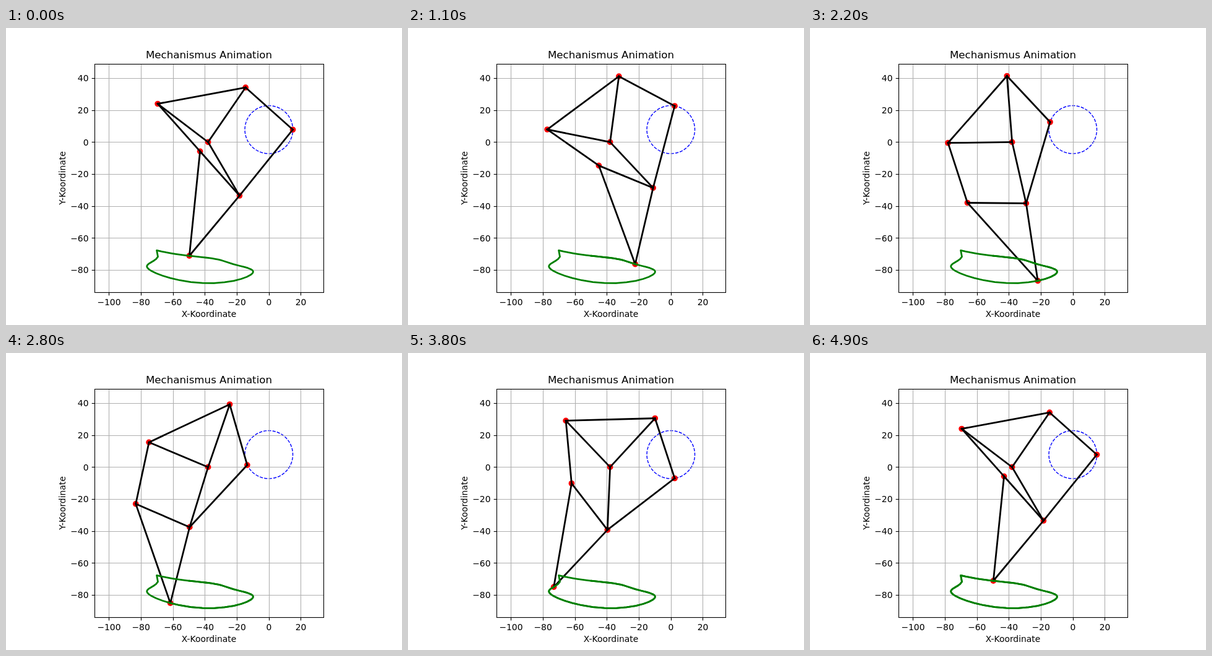
An HTML page for the animation above (5 s loop, 640x480 px).

```html
<!DOCTYPE html>
<html lang="de">
<head>
<meta charset="utf-8">
<title>Mechanismus Animation</title>
<style>
  html, body { margin: 0; width: 100%; height: 100%; overflow: hidden; background: #fff; }
  svg { display: block; width: 640px; height: 480px; }
  text { font-family: "DejaVu Sans", sans-serif; font-size: 13.89px; fill: #000; }
</style>
</head>
<body>
<svg id="plot" viewBox="0 0 640 480"></svg>
<script>
const STEPS = 50, STEP_MS = 100;
const SCALE = 2.5835, X0 = 424.8, Y0 = 184.4;
const BOX = { left: 143.5, right: 513.5, top: 58.5, bottom: 427.5 };
const CRANK = { x: 0, y: 7.8, r: 15 };
const PIVOT = [-38, 0];

// Joints: 0 pivot, 1 crank, 2 top, 3 left, 4 knee, 5 ankle, 6 foot
const LINKS = [
  [1, 2, 39.5], [1, 4, 53], [0, 2, 41.5], [0, 4, 39.3], [0, 3, 40.1],
  [2, 3, 55.8], [3, 5, 39.4], [4, 5, 36.7], [5, 6, 65.7], [4, 6, 49]
];
const len = (a, b) => LINKS.find(l => l[0] === a && l[1] === b)[2];

const svg = document.getElementById('plot');
const px = x => X0 + x * SCALE;
const py = y => Y0 - y * SCALE;
const snap = v => Math.floor(v + 0.5) + 0.5;

function add(tag, attrs, text) {
  const el = document.createElementNS('http://www.w3.org/2000/svg', tag);
  for (const k in attrs) el.setAttribute(k, attrs[k]);
  if (text) el.textContent = text;
  svg.appendChild(el);
  return el;
}

function line(x1, y1, x2, y2, stroke, width) {
  return add('line', { x1, y1, x2, y2, stroke, 'stroke-width': width });
}

// Where circles around p and q cross; touching point on the axis if they do not.
function meet(p, q, r1, r2, side) {
  const dx = q[0] - p[0], dy = q[1] - p[1], d = Math.hypot(dx, dy);
  const a = (r1 * r1 - r2 * r2 + d * d) / (2 * d);
  const h = side * Math.sqrt(Math.max(0, r1 * r1 - a * a));
  return [p[0] + (a * dx - h * dy) / d, p[1] + (a * dy + h * dx) / d];
}

// Least-squares fit of the link lengths; pivot and crank stay put.
function relax(pts) {
  const inner = LINKS.slice(0, 8);
  for (let n = 0; n < 3000; n++) {
    const move = pts.map(() => [0, 0]);
    let worst = 0;
    for (const [a, b, l] of inner) {
      const dx = pts[b][0] - pts[a][0], dy = pts[b][1] - pts[a][1];
      const d = Math.hypot(dx, dy), f = 0.25 * (d - l) / d;
      worst = Math.max(worst, Math.abs(d - l));
      move[a][0] += f * dx; move[a][1] += f * dy;
      move[b][0] -= f * dx; move[b][1] -= f * dy;
    }
    if (worst < 1e-6) return;
    for (let i = 2; i < 6; i++) {
      pts[i][0] += move[i][0];
      pts[i][1] += move[i][1];
    }
  }
}

function pose(angle) {
  const crank = [CRANK.x + CRANK.r * Math.cos(angle), CRANK.y + CRANK.r * Math.sin(angle)];
  const top = meet(PIVOT, crank, len(0, 2), len(1, 2), 1);
  const knee = meet(PIVOT, crank, len(0, 4), len(1, 4), -1);
  const left = meet(PIVOT, top, len(0, 3), len(2, 3), 1);
  const ankle = meet(left, knee, len(3, 5), len(4, 5), -1);
  const pts = [PIVOT, crank, top, left, knee, ankle];
  relax(pts);
  pts.push(meet(pts[5], pts[4], len(5, 6), len(4, 6), -1));
  return pts.map(([x, y]) => [px(x), py(y)]);
}

const poses = Array.from({ length: STEPS }, (_, i) => pose(2 * Math.PI * i / (STEPS - 1)));
const track = poses.map(p => p[6].map(v => v.toFixed(2)).join(','));

// Crank circle, starting at its lowest point
const cx = px(CRANK.x), cy = py(CRANK.y), cr = CRANK.r * SCALE;
add('path', {
  d: `M${cx},${cy + cr}A${cr},${cr} 0 0 0 ${cx},${cy - cr}A${cr},${cr} 0 0 0 ${cx},${cy + cr}`,
  fill: 'none', stroke: '#00f', 'stroke-width': 1.39, 'stroke-dasharray': '5.14 2.22'
});

// Grid, ticks and labels
const label = v => String(v).replace('-', '\u2212');
for (let v = -100; v <= 20; v += 20) {
  const x = snap(px(v));
  line(x, BOX.top, x, BOX.bottom, '#b0b0b0', 1.11);
  line(x, BOX.bottom, x, BOX.bottom + 4.86, '#000', 1.11);
  add('text', { x: px(v), y: 448, 'text-anchor': 'middle' }, label(v));
}
for (let v = -80; v <= 40; v += 20) {
  const y = snap(py(v));
  line(BOX.left, y, BOX.right, y, '#b0b0b0', 1.11);
  line(BOX.left - 4.86, y, BOX.left, y, '#000', 1.11);
  add('text', { x: 133.5, y: py(v) + 5.3, 'text-anchor': 'end' }, label(v));
}

const dots = poses[0].map(() => add('circle', { r: 4.86, fill: '#f00' }));
const bars = LINKS.map(() => {
  const bar = line(0, 0, 0, 0, '#000', 2.78);
  bar.setAttribute('stroke-linecap', 'square');
  return bar;
});
const trace = points => add('polyline', {
  points, fill: 'none', stroke: '#008000', 'stroke-width': 2.78,
  'stroke-linejoin': 'round', 'stroke-linecap': 'square'
});
trace(track.join(' '));
const trail = trace('');

add('rect', {
  x: BOX.left, y: BOX.top, width: BOX.right - BOX.left, height: BOX.bottom - BOX.top,
  fill: 'none', stroke: '#000', 'stroke-width': 1.11
});
add('text', { x: 328, y: 49.2, 'text-anchor': 'middle', style: 'font-size:16.67px' }, 'Mechanismus Animation');
add('text', { x: 328, y: 467, 'text-anchor': 'middle' }, 'X-Koordinate');
add('text', { transform: 'translate(96 242.5) rotate(-90)', 'text-anchor': 'middle' }, 'Y-Koordinate');

let shown = -1;
function draw() {
  const i = Math.floor(performance.now() / STEP_MS) % STEPS;
  if (i !== shown) {
    shown = i;
    const pts = poses[i];
    dots.forEach((dot, n) => {
      dot.setAttribute('cx', pts[n][0]);
      dot.setAttribute('cy', pts[n][1]);
    });
    bars.forEach((bar, n) => {
      const [a, b] = LINKS[n];
      bar.setAttribute('x1', pts[a][0]);
      bar.setAttribute('y1', pts[a][1]);
      bar.setAttribute('x2', pts[b][0]);
      bar.setAttribute('y2', pts[b][1]);
    });
    trail.setAttribute('points', i ? track.slice(0, i + 1).join(' ') : '');
  }
  requestAnimationFrame(draw);
}
draw();
</script>
</body>
</html>
```
